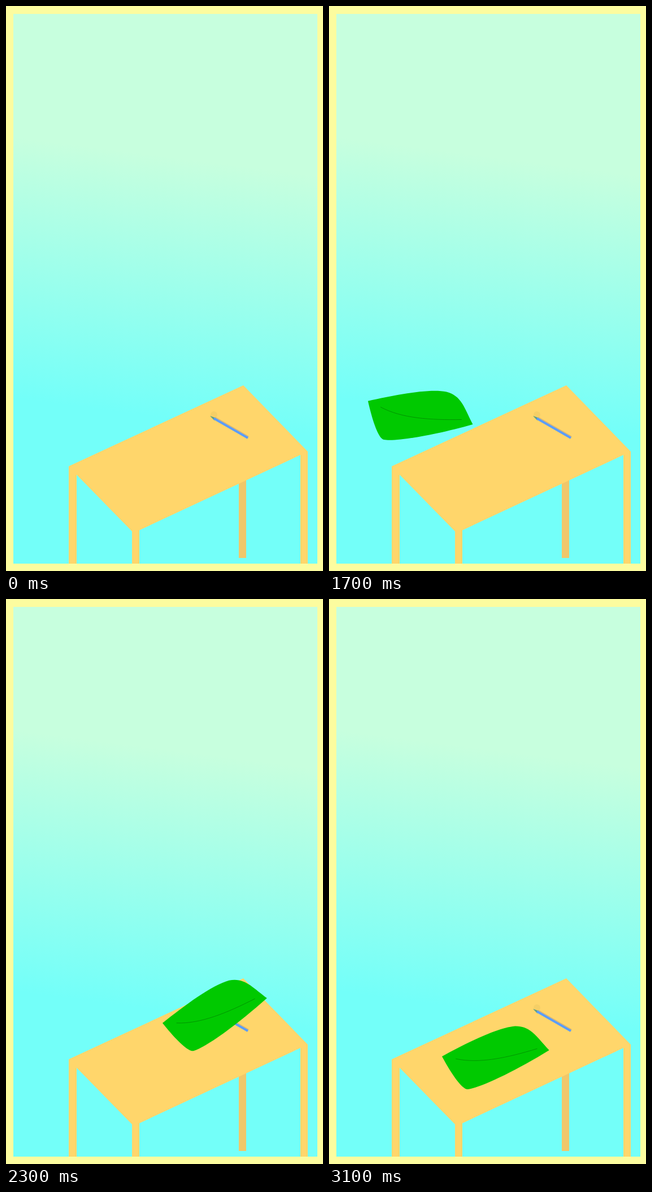
Write an HTML page that moves like this. It is 561 px wide and 998 px high and loops after 8 s.

```html
<!DOCTYPE html>
<html lang="en">
<head>
<meta charset="utf-8">
<title>Leaf landing on a table</title>
<style>
  html, body { margin: 0; width: 100%; height: 100%; overflow: hidden; background: #fcfc9f; }
  svg { display: block; width: 100%; height: 100%; }
</style>
</head>
<body>
<svg viewBox="0 0 561 998">
  <defs>
    <linearGradient id="sky" gradientUnits="userSpaceOnUse" x1="280" y1="265" x2="222" y2="720">
      <stop offset="0" stop-color="#c7ffde"/>
      <stop offset="1" stop-color="#73fff9"/>
    </linearGradient>
    <clipPath id="window"><rect x="13" y="14" width="538" height="971"/></clipPath>
  </defs>
  <rect width="561" height="998" fill="#fcfc9f"/>
  <g clip-path="url(#window)">
    <rect width="561" height="998" fill="url(#sky)"/>

    <!-- table -->
    <path d="M412 842 425 836V975H412Z" fill="#f0c76a"/>
    <path d="M420 670 534 787V985H521V793L236 926V985H223V928L125 828V985H111V813Z" fill="#ffd66b"/>

    <!-- pencil -->
    <circle cx="368" cy="722" r="6" fill="#f5cf66"/>
    <path d="M370 727 429 761" stroke="#dfba70" stroke-width="3"/>
    <path d="M361 724 371 727.5 368.5 732Z" fill="#5d9f86"/>
    <path d="M368 728.5 428 763" stroke="#5b9dfc" stroke-width="4"/>

    <!-- leaf, left tip at the origin -->
    <g id="leaf">
      <path fill="#00c900" d="M0 0C45 -21 100 -45 132 -46C160 -45 169 -25 190 0C125 35 62 60 42 60.5C33 60.5 17 36 0 0Z"/>
      <path fill="none" stroke="#008c00" stroke-width=".8" d="M24 5.5C65 17 115 9 169 -4"/>
    </g>
  </g>
</svg>
<script>
  const LOOP = 8000, STEP = 100;
  const PIVOT = [95, 7];
  // time, pivot x, pivot y, angle in degrees
  const keys = [
    [1200, -82, 717, 34.4],
    [1700, 160.2, 725.2, 12.5],
    [1900, 245.4, 728, 3.7],
    [2300, 371, 733.9, -13.4],
    [2425, 412, 738, -18.3],
    [3063, 295.2, 809.5, -3.3]
  ];
  const leaf = document.getElementById('leaf');

  function pose(time) {
    const t = Math.min(Math.max(time, keys[0][0]), keys.at(-1)[0]);
    const next = Math.max(1, keys.findIndex(key => t <= key[0]));
    const a = keys[next - 1], b = keys[next];
    const k = (t - a[0]) / (b[0] - a[0]);
    return a.map((value, i) => value + (b[i] - value) * k).slice(1);
  }

  function draw(now) {
    const time = Math.floor(now % LOOP / STEP) * STEP;
    const [x, y, angle] = pose(time);
    leaf.setAttribute('transform',
      `translate(${x} ${y}) rotate(${angle}) translate(${-PIVOT[0]} ${-PIVOT[1]})`);
    leaf.setAttribute('visibility', time > keys[0][0] ? 'visible' : 'hidden');
  }

  const start = performance.now();
  function tick() {
    draw(performance.now() - start);
    requestAnimationFrame(tick);
  }
  tick();
</script>
</body>
</html>
```
